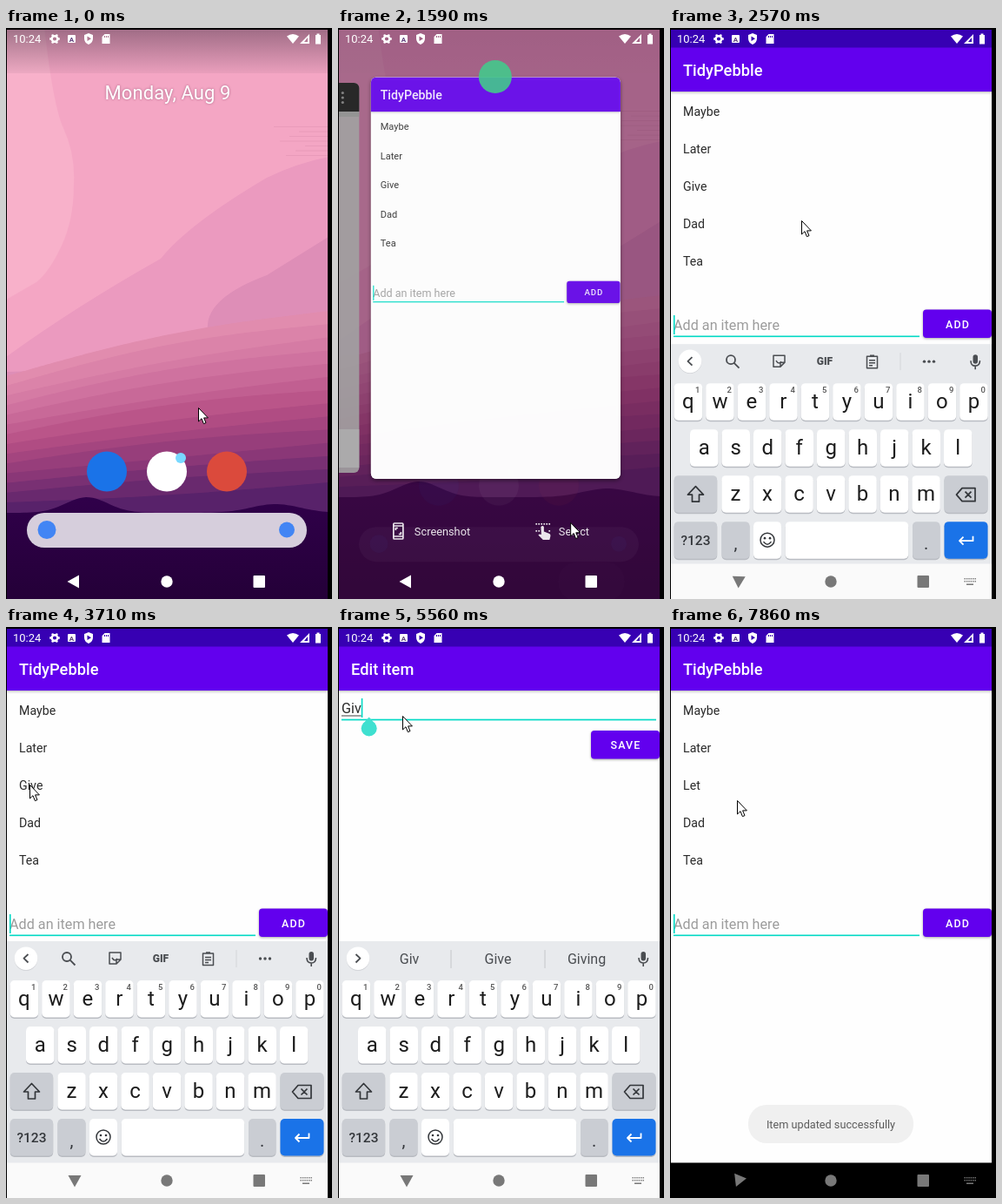
Recreate the animation shown at these times as an HTML page with a canvas. Size 375 by 656 pixels, loop 8 s.

```html
<!DOCTYPE html>
<html lang="en">
<head>
<meta charset="utf-8">
<title>To-do list demo</title>
<style>
html, body { margin: 0; width: 100%; height: 100%; overflow: hidden; background: #000; }
canvas { display: block; width: 375px; height: 656px; }
</style>
</head>
<body>
<canvas id="stage" width="375" height="656"></canvas>
<script>
const ctx = document.getElementById('stage').getContext('2d');
const LOOP = 8000;
const PURPLE = '#6200ee', TEAL = '#03dac5', INK = '#2b2b2b';
const CARD = { scale: 0.777, x: 42, y: 56.5 };
const WORDS = ['Give', 'Giving', 'Given', 'Let', 'Letter', 'Lets'];

// ---- timing helpers
const ramp = (t, a, b) => Math.min(1, Math.max(0, (t - a) / (b - a)));
const easeOut = (t, a, b, power = 3) => 1 - (1 - ramp(t, a, b)) ** power;
const smooth = (t, a, b) => { const p = ramp(t, a, b); return p * p * (3 - 2 * p); };
const mix = (a, b, p) => a + (b - a) * p;
const blink = (t, since) => Math.floor((t - since) / 500) % 2 === 0;

// Pointer moves: from time, to time, x, y
const MOVES = [
  [120, 600, 293, 645], [1480, 2090, 151, 221], [2700, 2930, 27, 181], [3950, 4310, 42, 157],
  [4310, 4570, 86, 79], [5200, 5440, 74, 102], [6790, 7190, 327, 118], [7500, 7860, 77, 199]
];
const pointerAt = t => MOVES.reduce(([x, y], [from, to, nx, ny]) => {
  const p = ramp(t, from, to);
  return [mix(x, nx, p), mix(y, ny, p)];
}, [221, 436]);

function typedText(t) {
  if (t < 6400) return 'Give'.slice(0, Math.max(0, 4 - Math.ceil(Math.max(0, t - 5499) / 140)));
  return 'Let'.slice(0, 1 + Math.floor((t - 6400) / 240));
}
const suggestions = s => [s, ...WORDS.filter(w => w !== s && w.startsWith(s))].slice(0, 3);

// ---- drawing helpers
function group(draw, { x = 0, y = 0, scale = 1, alpha = 1 } = {}) {
  if (alpha <= 0) return;
  ctx.save();
  ctx.translate(x, y);
  ctx.scale(scale, scale);
  ctx.globalAlpha *= alpha;
  draw();
  ctx.restore();
}
function withShadow(color, blur, dy, draw) {
  ctx.shadowColor = color;
  ctx.shadowBlur = blur;
  ctx.shadowOffsetY = dy;
  draw();
  ctx.shadowColor = 'transparent';
}
function rect(x, y, w, h, color) {
  ctx.fillStyle = color;
  ctx.fillRect(x, y, w, h);
}
function pill(x, y, w, h, r, color) {
  ctx.beginPath();
  ctx.roundRect(x, y, w, h, r);
  ctx.fillStyle = color;
  ctx.fill();
}
function disc(x, y, r, color) {
  ctx.beginPath();
  ctx.arc(x, y, r, 0, 7);
  ctx.fillStyle = color;
  ctx.fill();
}
function fillPath(d, color, rule) {
  ctx.fillStyle = color;
  ctx.fill(new Path2D(d), rule);
}
function line(d, color, width = 1.6) {
  ctx.strokeStyle = color;
  ctx.lineWidth = width;
  ctx.lineJoin = 'round';
  ctx.stroke(new Path2D(d));
}
function text(s, x, y, size, color, { weight = 400, align = 'left', spacing = 0 } = {}) {
  ctx.font = `${weight} ${size}px Roboto, sans-serif`;
  ctx.textAlign = align;
  ctx.letterSpacing = spacing + 'px';
  ctx.fillStyle = color;
  ctx.fillText(s, x, y);
}
function gradient(y0, y1, ...colors) {
  const g = ctx.createLinearGradient(0, y0, 0, y1);
  colors.forEach((c, i) => g.addColorStop(i / (colors.length - 1), c));
  return g;
}
const gray = v => `rgb(${Math.round(v)},${Math.round(v)},${Math.round(v)})`;

// ---- home screen
function hill(height, color) {
  ctx.beginPath();
  ctx.moveTo(0, 700);
  for (let x = 0; x <= 372; x += 4) ctx.lineTo(x, height(x));
  ctx.lineTo(372, 700);
  ctx.fillStyle = color;
  ctx.fill();
}
const bump = (x, center, width) => Math.exp(-(((x - center) / width) ** 2));

function duskColor(p) {
  const stops = [[225, 140, 174], [205, 112, 158], [182, 80, 133], [142, 57, 120], [88, 34, 106]];
  const i = Math.min(3, Math.floor(p * 4));
  return `rgb(${stops[i].map((c, k) => Math.round(mix(c, stops[i + 1][k], p * 4 - i)))})`;
}
function wallpaper() {
  rect(0, 0, 371, 656, '#f4a6c4');
  fillPath('M0 -40H40Q52 85 66 115T78 180Q78 220 64 250T35 292L0 312Z', '#f8b1ca');
  for (let i = 0; i < 7; i++) rect(308 + i * 29 % 40, 113 + i * 5.5, 62, 1, '#e99bba');
  fillPath('M0 378Q80 320 178 265Q210 225 300 172Q335 155 371 148V700H0Z', '#eb9abf');
  fillPath('M0 395Q210 390 232 345Q230 310 300 284L371 240V700H0Z', '#de8eb7');
  const bands = 14;
  for (let i = 0; i < bands; i++) {
    const p = i / (bands - 1);
    const left = mix(400, 545, p), right = mix(325, 522, p), sag = 10 * (1 - p) + 3 * Math.sin(i * 2.3);
    hill(x => mix(left, right, x / 371) - sag * Math.sin(x / 118), duskColor(p));
  }
  hill(x => 557 - 18 * bump(x, 93, 34) - 10 * bump(x, 310, 40), gradient(540, 656, '#30004a', '#240038'));
}
function home() {
  withShadow('rgba(60,0,40,.4)', 3, 0, () =>
    text('Monday, Aug 9', 186, 82, 22, '#fff', { align: 'center', spacing: 0.1 }));
  disc(116, 509.5, 23, '#1a73e8');
  disc(185, 509.5, 23, '#fff');
  disc(201, 494, 6, '#78d9ff');
  disc(254, 509.5, 23, '#db4a3c');
  pill(24, 557, 322, 40, 20, '#d6cedc');
  disc(47, 576.5, 10.5, '#4285f4');
  disc(323, 576.5, 9, '#4285f4');
}

// ---- system bars
function gear(x, y, color) {
  ctx.strokeStyle = color;
  ctx.lineWidth = 2.4;
  ctx.beginPath();
  ctx.arc(x, y, 3.3, 0, 7);
  for (let a = 0; a < 6; a++) {
    const dx = Math.cos(a * Math.PI / 3), dy = Math.sin(a * Math.PI / 3);
    ctx.moveTo(x + 4 * dx, y + 4 * dy);
    ctx.lineTo(x + 5.8 * dx, y + 5.8 * dy);
  }
  ctx.stroke();
}
function statusIcons() {
  const white = '#fff';
  text('10:24', 8, 17, 13, white);
  gear(56, 12.5, white);
  pill(71, 8, 9, 9, 1, white);
  text('A', 75.5, 15.5, 8, '#5b3a78', { weight: 700, align: 'center' });
  fillPath('M95 6L100 8V12Q100 17 95 19Q90 17 90 12V8ZM93.5 9.5V15L98 12.2Z', white, 'evenodd');
  fillPath('M113.5 7H119.5V18H110.5V10Z M113 9V11H114V9Z M115 9V11H116V9Z M117 9V11H118V9Z', white, 'evenodd');
  fillPath('M323 9.5Q330 4.5 337 9.5L330 18Z', white);
  fillPath('M349 7V18H338Z M347 11V16H343Z', white, 'evenodd');
  fillPath('M357.5 6.5H360.5V8H362V18.5H356V8H357.5Z', white);
}
function navIcons(t) {
  const turn = smooth(t, 2400, 2590) - smooth(t, 4080, 4290) + smooth(t, 4800, 5000) - smooth(t, 7790, 8010);
  const dim = smooth(t, 2400, 2500) - smooth(t, 4080, 4700) + smooth(t, 4800, 4950);
  const color = gray(255 - 135 * dim);
  ctx.save();
  ctx.translate(78.5, 635.5);
  ctx.rotate(-turn * Math.PI / 2);
  fillPath('M-8 .5L5.5 -7V8Z', color);
  ctx.restore();
  disc(185, 636, 6.7, color);
  pill(284.5, 629, 13.5, 14, 1, color);
  group(() => {
    for (let i = 0; i < 12; i++) rect(338.5 + i % 6 * 2.4, 632 + Math.floor(i / 6) * 3, 1.4, 1.5, color);
    rect(341, 638.5, 8, 1.5, color);
  }, { alpha: Math.min(1, turn * 4) });
}

// ---- app screens
function header(title) {
  rect(0, 22, 371, 594, '#fefefe');
  withShadow('rgba(0,0,0,.3)', 3, 1, () => rect(0, 22, 371, 51, PURPLE));
  text(title, 15, 55, 18.3, '#fff', { weight: 500 });
}
function button(label, y) {
  withShadow('rgba(0,0,0,.35)', 3, 1, () => pill(291, y, 79, 32.5, 4, PURPLE));
  text(label, 331, y + 21, 12.5, '#fff', { weight: 500, align: 'center', spacing: 1.1 });
}
function listScreen(t) {
  header('TidyPebble');
  const press = ramp(t, 3900, 4000) * (t < 4400);
  rect(0, 159, 371, 43, `rgba(0,0,0,${0.12 * press})`);
  ['Maybe', 'Later', t < 7400 ? 'Give' : 'Let', 'Dad', 'Tea'].forEach((item, i) =>
    text(item, 15, 100.5 + 43 * i, 14.2, INK));
  text('Add an item here', 4, 347, 16.2, '#9c9c9c');
  if (t < 2800 || t > 7500 || blink(t, 3300)) rect(4, 330, 1.6, 22, TEAL);
  rect(4, 353.5, 283, 1.6, TEAL);
  button('ADD', 323.5);
}
function editScreen(t) {
  header('Edit item');
  const value = typedText(t), handle = '#3fe0d0';
  text(value, 4, 99, 16.2, INK);
  const end = 4 + ctx.measureText(value).width;
  if (t > 4720) {
    rect(4, 105.7, 362, 1.7, TEAL);
    if (value) rect(4, 101.5, end - 4, 1, '#444');
    if (t < 7300) rect(end, 82, 1.6, 22, TEAL);
    if (t < 5620) {
      disc(35.7, 116.5, 9, handle);
      fillPath('M35.7 103.5L42.5 111H29Z', handle);
    }
  } else {
    rect(4, 106, 362, 1, '#8a8a8a');
  }
  button('SAVE', 119);
  pill(291, 119, 79, 32.5, 4, `rgba(255,255,255,${0.2 * ramp(t, 7200, 7330)})`);
}
function toast() {
  pill(90, 549, 190, 44, 21, '#f0f0f0');
  text('Item updated successfully', 185, 576, 12.7, '#5c5c5c', { align: 'center' });
}

// ---- keyboard
const KEY_GRAY = '#cacdd3', KEY_INK = '#33363a';

function key(x, y, w, color = '#fff') {
  pill(x, y + 1, w, 43, 5, '#b9bcc2');
  pill(x, y, w, 42.5, 5, color);
}
function letters(chars, x, y, digits) {
  [...chars].forEach((c, i) => {
    const left = x + i * 36.5;
    key(left, y, 32.5);
    text(c, left + 16.2, y + 29, 24, '#1c1c1c', { align: 'center' });
    if (digits) text((i + 1) % 10, left + 27, y + 10.5, 9.5, '#555', { weight: 500, align: 'center' });
  });
}
function toolbar(words) {
  const ink = '#4a4d51';
  disc(23, 381.5, 13.3, '#cfd1d5');
  disc(23, 380.7, 13.3, '#fff');
  line(words ? 'M20.5 376L25.5 380.7 20.5 385.5' : 'M25.5 376L20.5 380.7 25.5 385.5', ink, 1.8);
  if (words) {
    words.forEach((w, i) => text(w, 82 + 102 * i, 387, 16, ink, { align: 'center' }));
    for (const x of [129.5, 237.5]) rect(x, 371, 1, 21, '#c4c6ca');
  } else {
    line('M75 379A5 5 0 1 1 65 379A5 5 0 1 1 75 379M73.7 382.7L79.5 388.5', ink, 1.8);
    line('M119 374H132V382L127 387H119ZM132 382H127V387M122 380Q125 385 128 381', ink, 1.5);
    text('GIF', 178, 385, 12, ink, { weight: 900, align: 'center' });
    line('M226.5 375H238.5V388.5H226.5ZM230 374H235M229 379.5H236M229 382.5H236M229 385.5H233', ink, 1.5);
    rect(264.5, 371, 1, 20, '#d4d6da');
    for (const x of [292.5, 298, 303.5]) disc(x, 381, 1.7, ink);
  }
  pill(348.5, 373, 5.5, 10.5, 3, ink);
  line('M346 380Q346 386 351.2 386T356.5 380M351.2 386V390', ink, 1.6);
}
function keyboard(words) {
  rect(0, 361, 371, 256, '#e8eaed');
  toolbar(words);
  letters('qwertyuiop', 4.7, 406, true);
  letters('asdfghjkl', 23, 459);
  letters('zxcvbnm', 59.3, 512);
  key(4.7, 512, 49.5, KEY_GRAY);
  line('M29.5 524.5L38.5 534H33.5V542H25.5V534H20.5Z', KEY_INK, 1.7);
  key(315.5, 512, 50, KEY_GRAY);
  line('M336 526.5H351V541.5H336L329.5 534ZM339.5 530.5L346.5 537.5M346.5 530.5L339.5 537.5', KEY_INK, 1.7);
  key(4.7, 565, 49.5, KEY_GRAY);
  text('?123', 29.5, 592, 15.5, KEY_INK, { weight: 500, align: 'center' });
  key(59.5, 565, 32, KEY_GRAY);
  text(',', 75.5, 597, 20, KEY_INK, { align: 'center' });
  key(96, 565, 32);
  line('M120 586A8 8 0 1 1 104 586A8 8 0 1 1 120 586M107.5 588Q112 594 116.5 588', KEY_INK, 1.5);
  for (const x of [109, 115]) disc(x, 584, 1.3, KEY_INK);
  key(132.7, 565, 141.5);
  key(279, 565, 31.5, KEY_GRAY);
  text('.', 294.7, 597, 20, KEY_INK, { align: 'center' });
  key(315.5, 565, 50, '#1a73e8');
  line('M348.5 581.5V587H333M337.5 582.5L333 587L337.5 591.5', '#fff', 1.8);
}

// ---- scenes
function previousCard() {
  pill(-12, 63, 40.5, 448, 6, '#a2a2a2');
  pill(-12, 63, 40.5, 33, [6, 6, 0, 0], '#1b1b1b');
  rect(0, 96, 28.5, 6, '#949494');
  rect(0, 461, 28.5, 44, '#adadad');
  for (const y of [74.5, 80, 85.5]) disc(9.5, y, 1.6, '#8c8c8c');
}
function recentsActions() {
  const white = '#fff';
  line('M69 569H78Q79 569 79 570V586Q79 587 78 587H69Q68 587 68 586V570Q68 569 69 569ZM68 572H79M68 584H79M70.5 577V574.5H73M76.5 579V581.5H74', white, 1.7);
  text('Screenshot', 92, 582.5, 12.8, white);
  for (let i = 0; i < 6; i++) {
    rect(231.5 + i * 3, 569, 1.7, 1.7, white);
    if (i < 2 || i > 4) rect(231.5 + i * 3, 577, 1.7, 1.7, white);
  }
  fillPath('M237.5 573Q239.5 571 241 573V578.5L247.5 581Q249 582 248.5 584L247.5 588H240L234.5 582.5L236 581.5L238 582Z', white);
  text('Select', 258, 582.5, 12.8, white);
}
function appCard(t, open) {
  const scale = mix(CARD.scale, 1, open);
  group(() => {
    withShadow('rgba(0,0,0,.5)', 4, 2, () => pill(0, 0, 369.5, 594, 8 * (1 - open), '#fff'));
    ctx.clip();
    ctx.translate(-1, -22);
    listScreen(t);
  }, { x: mix(CARD.x, 1, open), y: mix(CARD.y, 22, open), scale });
}
function launcherScene(t) {
  const enter = easeOut(t, 1400, 1760), open = smooth(t, 2220, 2470);
  group(wallpaper, { y: -20 * enter });
  if (enter > 0) rect(0, 636, 371, 20, `rgba(36,0,56,${enter})`);
  group(() => rect(0, 2, 371, 50, gradient(2, 52, 'rgba(60,40,60,.45)', 'rgba(60,40,60,.06)')), { alpha: 1 - enter });
  rect(0, 0, 371, 656, `rgba(68,16,62,${0.5 * enter})`);
  group(home, { y: 18 * enter, alpha: 1 - ramp(t, 1380, 1600) });

  const half = 38.5 * easeOut(t, 620, 1050);
  pill(291.5 - half, 614, half * 2, 44, Math.min(21, half), `rgba(255,255,255,${0.2 * (1 - ramp(t, 1370, 1600))})`);
  group(() => { statusIcons(); navIcons(t); }, { alpha: 1 - ramp(t, 2090, 2200) });

  group(() => {
    group(previousCard, { x: -60 * open });
    appCard(t, open);
    group(() => disc(185, 56, 19, '#43c98c'), { alpha: 1 - 3 * open });
    group(recentsActions, { alpha: 1 - ramp(t, 2150, 2280) });
  }, { x: -40 * (1 - enter), alpha: enter });
  group(() => {
    rect(0, 2, 371, 20.5, '#3700b3');
    rect(0, 615, 371, 41, '#000');
    statusIcons();
    navIcons(t);
  }, { alpha: open });
}
function appScene(t) {
  const edit = smooth(t, 4040, 4240) - smooth(t, 7540, 7680);
  if (edit < 1) listScreen(t);
  group(() => editScreen(t), { y: t < 5000 ? 25 * (1 - edit) : 0, alpha: edit });
  group(toast, { alpha: ramp(t, 7680, 7850) });
  rect(0, 2, 371, 20.5, '#3700b3');
  statusIcons();

  const shown = easeOut(t, 2380, 2690, 5) - smooth(t, 4070, 4290) + easeOut(t, 4770, 5180, 5) - smooth(t, 7560, 7800);
  const words = t > 4700 && typedText(t) && suggestions(typedText(t));
  if (shown > 0) group(() => keyboard(words), { y: 256 * (1 - shown) });
  const light = ramp(t, 2430, 2520) - ramp(t, 4080, 4220) + ramp(t, 4820, 4920) - ramp(t, 7650, 7760);
  rect(0, 615.5, 371, 41, gray(250 * light));
  navIcons(t);
}
function pointer(t) {
  const [x, y] = pointerAt(t);
  group(() => {
    const arrow = 'M.5 .5V16L4 12.7 6.4 18.7 9 17.6 6.6 11.9H11.4Z';
    fillPath(arrow, '#fff');
    line(arrow, '#000', 1);
  }, { x, y });
}

function render(t) {
  rect(0, 0, 375, 656, '#000');
  ctx.save();
  ctx.beginPath();
  ctx.rect(1, 2, 369, 654);
  ctx.clip();
  if (t < 2470) launcherScene(t);
  else appScene(t);
  ctx.restore();
  pointer(t);
}

const start = performance.now();
function tick() {
  render((performance.now() - start) % LOOP);
  requestAnimationFrame(tick);
}
tick();
</script>
</body>
</html>
```
